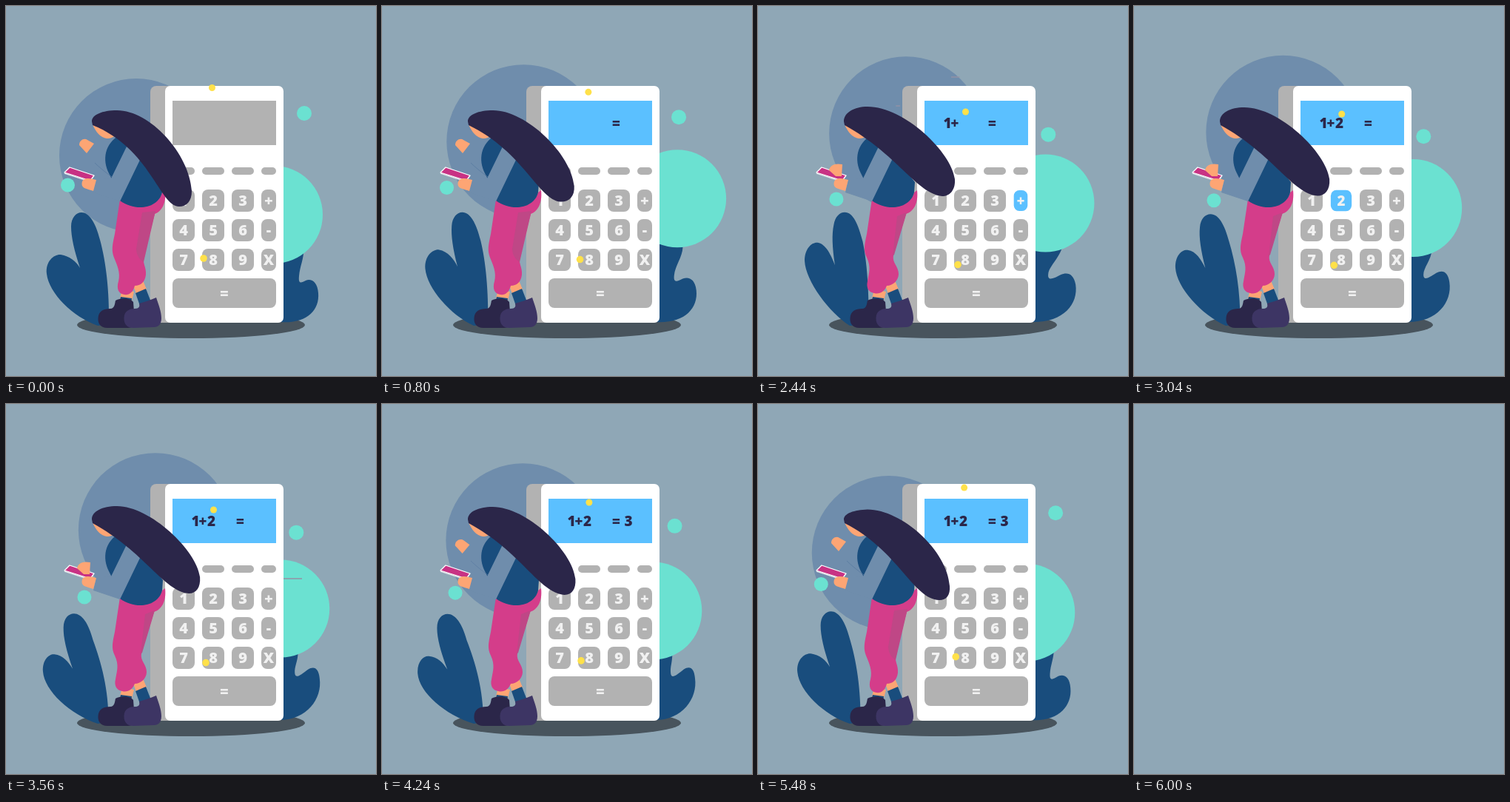
Recreate the animation shown at these times as an HTML page. Size 500 by 500 pixels, loop 6040 ms.

```html
<!DOCTYPE html>
<html lang="en">
<head>
<meta charset="utf-8">
<title>Calculator</title>
<style>
  html, body { margin: 0; width: 100%; height: 100%; overflow: hidden; background: #8fa7b6; }
  svg { display: block; width: 100vw; height: 100vh; }
  text { font: 800 20px "Open Sans", "Noto Sans", sans-serif; text-anchor: middle; }
  #keys text { fill: #f1f1f1; }
  #screen text { fill: #2b2649; font-size: 19px; }
  .streak { stroke: #9592a5; stroke-width: 1.4; }
  .skin { fill: #fda574; }
  .navy { fill: #194d7d; }
  .arm { fill: #6f8dac; }
</style>
</head>
<body>
<svg viewBox="0 0 500 500">
  <g id="scene">
    <circle id="disc" class="arm" r="104"/>
    <ellipse cx="250" cy="431" rx="154" ry="18" fill="#48545d"/>
    <path id="leafL" class="navy"/>
    <path id="leafR" class="navy"/>
    <circle id="sun" r="66" fill="#6be1d1"/>
    <line id="streak1" class="streak" y1="96" y2="96"/>
    <line id="streak2" class="streak" y1="135" y2="135"/>
    <line id="streak3" class="streak" y1="236" y2="236"/>

    <rect x="195" y="108" width="60" height="320" rx="8" fill="#b2b2b2"/>
    <rect x="215" y="108" width="160" height="320" rx="7" fill="#fff"/>
    <rect x="225" y="128" width="140" height="60" fill="#b2b2b2"/>
    <g id="screen">
      <rect id="glow" x="225" y="128" width="140" height="60" fill="#5bc0ff"/>
      <text id="d1" x="256" y="165">1</text>
      <text id="dPlus" x="266" y="165">+</text>
      <text id="d2" x="277.5" y="165">2</text>
      <text id="dEq" x="316.5" y="165">=</text>
      <text id="d3" x="333" y="165">3</text>
    </g>
    <g id="keys"></g>

    <circle id="dotR" r="10" fill="#6be1d1"/>
    <circle id="dotL" r="9.5" fill="#6be1d1"/>

    <path class="skin" d="M157 383L173 386L170 398L154 395Z"/>
    <path class="navy" d="M155 393L170 395L169 404L153 402Z"/>
    <path fill="#2b2649" d="M148 398C155 394 168 394 172 400L174 426C174 432 170 435 165 435H137C128 435 124 429 124.500 422C125 412 132 409 141 409C147 409 147 402 148 398Z"/>
    <path class="skin" d="M171 375L185 371L190 383L176 389Z"/>
    <path class="navy" d="M175 388L189 382L196 400L181 405Z"/>
    <path fill="#3d3564" d="M180 402C187 400 196 397 203 394C206 403 210 413 210 422C210 430 206 434 200 434L172 435C163 435 159 429 159.500 421C160 412 167 409 174 409C180 409 181 406 180 402Z"/>
    <path id="pants" fill="#d43d8a"/>
    <path id="shade" fill="#bf4786"/>

    <path class="skin" d="M117 160C121 170 128 178 136 179C142 179 146 177 150 173L140 160Z"/>
    <path class="navy" d="M154 174C133 186 130 208 139 226L142 232L154 263C176 279 206 273 211 252L212 238L176 192Z"/>
    <path class="arm" d="M163 190L182 206L154 264L118 252L122 234L142 233Z"/>
    <path id="crease" d="M120 212Q128 220 143 231" fill="none" stroke="#56789f"/>
    <path d="M86 218L119 229L114 236L79 225Z" fill="#c83284" stroke="#fff" stroke-width="1.300" stroke-linejoin="round"/>
    <path d="M79 226L113 237" stroke="#e4e4ea" stroke-width="1.600"/>
    <path class="skin" d="M102.500 240C103 233 109 231 122 235L118 250C110 247 102 247 102.500 240Z"/>
    <path id="hand" class="skin"/>
    <path id="hair" fill="#2b2649"/>
    <circle id="spark1" r="4.500" fill="#ffe14a"/>
    <circle id="spark2" r="4.800" fill="#ffe14a"/>
  </g>
</svg>
<script>
const LOOP = 6040, STEP = 40, BLANK = 6000;
const $ = id => document.getElementById(id);
const set = (id, attrs) => { for (const k in attrs) $(id).setAttribute(k, attrs[k]); };
const ramp = (t, a, b) => Math.min(1, Math.max(0, (t - a) / (b - a)));
const wave = p => (1 - Math.cos(Math.PI * p)) / 2;

// Cubic-bezier ease-out (.05, .5, .35, 1)
function settle(p) {
  const curve = (s, a, b) => 3 * (1 - s) * (1 - s) * s * a + 3 * (1 - s) * s * s * b + s ** 3;
  let lo = 0, hi = 1;
  for (let i = 0; i < 24; i++) {
    const mid = (lo + hi) / 2;
    if (curve(mid, .05, .35) < p) lo = mid; else hi = mid;
  }
  return curve(lo, .5, 1);
}

// Blends the numbers of two strings with the same structure
function mix(a, b, p) {
  const number = /-?[\d.]+/g, ends = b.match(number);
  let i = 0;
  return a.replace(number, v => (+v + (ends[i++] - v) * p).toFixed(2));
}

function pose(t, times, poses, ease = wave) {
  let i = 0;
  while (i < times.length - 2 && t >= times[i + 1]) i++;
  return mix(poses[i], poses[i + 1], ease(ramp(t, times[i], times[i + 1])));
}

const leafL = [
  "M124 432C90 420 58 388 55 362C53 344 66 335 74 336C86 338 95 345 100 354C92 330 88 312 88 298C88 286 95 279 102 279C112 279 121 292 127 316C135 345 140 385 139 430Z",
  "M124 432C98 414 66 369 65 342C65 325 75 316 83 317C94 319 101 335 106 349C103 324 103 307 106 295C108 284 114 278 121 278C132 278 139 294 145 318C150 345 152 385 151 430Z",
  "M124 432C85 420 50 390 48 364C47 347 57 340 63 341C75 342 82 350 88 359C79 335 74 317 74 303C74 290 81 284 88 284C99 284 108 297 114 319C126 350 137 385 137 430Z"
];
const leafR = [
  "M370 427C405 430 424 412 422 388C421 372 412 368 405 371C398 375 395 375 396 365C397 352 403 340 402 330L370 310Z",
  "M370 427C413 428 434 404 430 377C427 362 418 360 409 364C399 369 391 372 392.500 362C394 350 412 338 415 318L370 300Z",
  "M370 427C405 427 427 398 423 370C422 356 416 353 408 358C398 366 391 372 390 364C389 355 392 350 392 338L370 310Z"
];
const hair = [
  "M116 156C116 147 130 141 150 141C195 141 248 200 251 250C251 264 244 271 234 271C208 271 195 192 117 161Z",
  "M116 156C116 147 130 141 150 141C195 141 262 200 266.500 238C268 252 260 260 247 259.500C215 256 188 200 117 161Z",
  "M116 156C116 144 130 136 148 136C198 136 262 198 266 234C267 249 259 257 249 257C215 254 188 200 117 161Z",
  "M116 156C116 145 130 138 150 138C195 138 258 198 262 234C263 248 257 256 247 256C213 253 188 200 117 161Z",
  "M116 156C116 148 130 143 148 142.500C195 143 256 198 259 246C260 258 255 265 245 265C210 264 190 198 117 161Z"
];
const pants = [
  "M154 261C175 279 205 272 211 252L215 249C217 267 210 278 201 281L187 335C183 347 190 352 189 363C188 373 182 378 174 378C172 387 166 391 160 390C152 389 149 382 152 372C155 360 150 350 146 340C142 330 144 322 147 308Z",
  "M154 261C175 279 205 272 211 252L215 249C217 267 210 278 200 281L183 337C181 347 190 352 190 362C190 371 182 378 174 378C171 386 164 390 157 388C149 387 146 380 148 372C150 360 153 353 147 340C142 330 144 322 147 308Z"
];
const shade = [
  "M184 279L202 277L186 346C180 342 176 336 176 328Z",
  "M188 284L201 279L184 336C183 337 183 337 182 338Z"
];
const hand = [
  "M99 188C99 181 106 178 110 181L119 186L109 199C104 196 99 194 99 188Z",
  "M96 222C97 215 104 212 114 214L113 230C105 230 96 228 96 222Z"
];

// Dots that drift out and back: [id, rest, far]
const drifters = [
  ["dotR", "403 145", "391.300 176.300"],
  ["dotL", "83.500 242", "108 262.700"],
  ["spark1", "278.500 110.500", "280.700 146"],
  ["spark2", "267 341", "270.300 350.300"]
];
// Key presses: [key, start, end]
const presses = [["1", 1740, 2060], ["+", 2280, 2600], ["2", 2820, 3140], ["=", 3700, 4020]];
const keyGroups = {};

function addKey(label, x, y, w, h) {
  const cx = x + w / 2, cy = y + h / 2;
  $("keys").insertAdjacentHTML("beforeend",
    `<g><rect x="${x}" y="${y}" width="${w}" height="${h}" rx="${Math.min(8, h / 2)}" fill="#b2b2b2"/>` +
    `<text x="${cx}" y="${cy + 7}">${label}</text></g>`);
  const group = $("keys").lastElementChild;
  if (label) keyGroups[label] = { group, rect: group.firstChild, cx, cy };
}

["    ", "123+", "456-", "789X"].forEach((row, r) => [...row].forEach((label, c) => {
  const w = c < 3 ? 30 : 20;
  if (r) addKey(label, 225 + 40 * c, 208 + 40 * r, w, 30);
  else addKey("", 225 + 40 * c, 218, w, 10);
}));
addKey("=", 225, 368, 140, 40);

function streak(id, from, to, head, tail, t) {
  const x1 = from + (to - from) * ramp(t, ...head), x2 = from + (to - from) * ramp(t, ...tail);
  set(id, { x1, x2, visibility: x1 === x2 ? "hidden" : "inherit" });
}

function draw(t) {
  $("scene").style.display = t >= BLANK ? "none" : "";
  const place = (id, xy) => set(id, { transform: `translate(${xy})` });

  place("disc", pose(t, [0, 4000, 6000], ["176 202", "202 170", "176 202"], settle));
  place("sun", pose(t, [0, 2000, 6000], ["362 282", "408 255", "362 282"], settle));
  for (const [id, rest, far] of drifters) place(id, pose(t, [0, 3000, 6000], [rest, far, rest]));

  const sway = [0, 2000, 4000, 6200];
  set("leafL", { d: pose(t, sway, [...leafL, leafL[0]]) });
  set("leafR", { d: pose(t, sway, [...leafR, leafR[0]]) });
  set("hair", { d: pose(t, [0, 1480, 2440, 3700, 5480, 6000], [...hair, hair[0]]) });

  const lean = wave(ramp(t, 1480, 2440)) - wave(ramp(t, 4240, 5400));
  set("pants", { d: mix(...pants, lean) });
  set("shade", { d: mix(...shade, lean) });
  const reach = wave(ramp(t, 1480, 2200)) - wave(ramp(t, 3600, 4400));
  set("hand", { d: mix(...hand, reach) });
  set("crease", { opacity: .7 * (1 - ramp(reach, 0, .5)) });

  streak("streak1", 404, 261, [1240, 1600], [1520, 2520], t);
  streak("streak2", 192, 150, [2400, 2700], [2480, 2900], t);
  streak("streak3", 400, 340, [3440, 3640], [3640, 4000], t);

  set("glow", { opacity: ramp(t, 480, 760) });
  const shows = { dEq: 760, d1: 1820, dPlus: 2360, d2: 2900, d3: 3860 };
  for (const id in shows) set(id, { visibility: t >= shows[id] ? "inherit" : "hidden" });

  for (const [label, start, end] of presses) {
    const { group, rect, cx, cy } = keyGroups[label];
    const down = t >= start && t < end;
    const scale = 1 - .07 * Math.sin(Math.PI * ramp(t, start, end));
    rect.setAttribute("fill", down ? "#5bc0ff" : "#b2b2b2");
    group.setAttribute("transform", `translate(${cx} ${cy}) scale(${scale}) translate(${-cx} ${-cy})`);
  }
}

const begin = performance.now();
function tick() {
  const t = (performance.now() - begin) % LOOP;
  draw(Math.floor(t / STEP) * STEP);
  requestAnimationFrame(tick);
}
tick();
</script>
</body>
</html>
```
